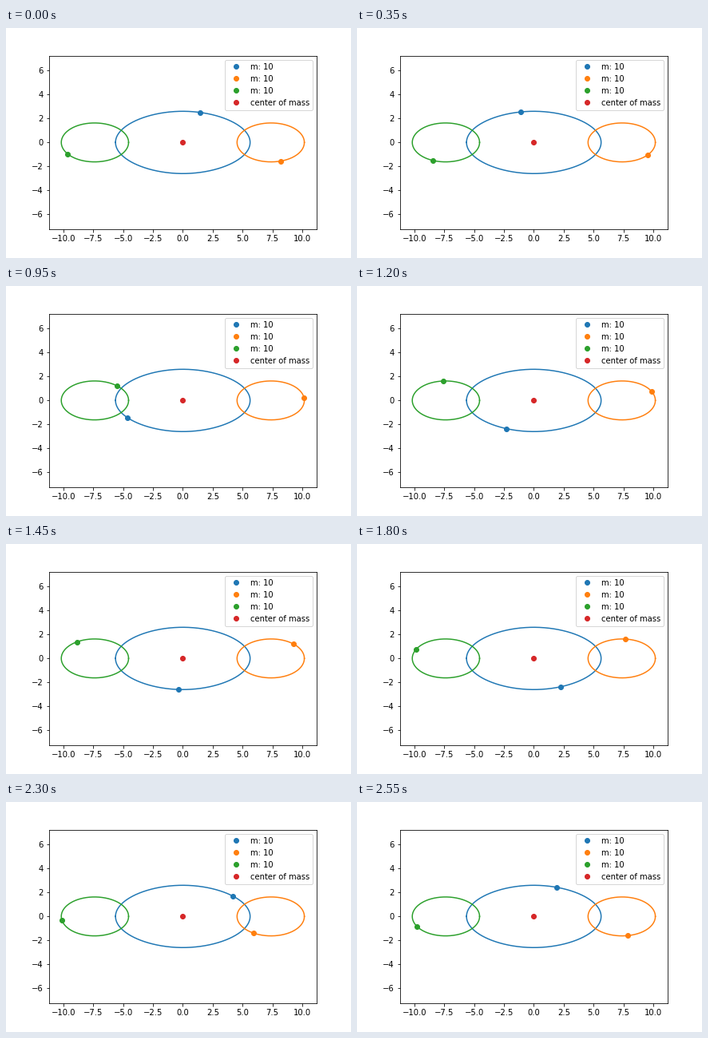
Recreate the animation shown at these times as a matplotlib script. Size 432 px wide and 288 px high, loop 2.6 s.

```python
import numpy as np
import matplotlib.pyplot as plt
from matplotlib.animation import FuncAnimation

FRAMES, INTERVAL = 52, 50
PERIOD = 52.3        # frames per revolution
ALIGNED = 17.0       # frame at which the bodies line up with the heavy loop on the left
MASS = 10
REACH = 10.17        # farthest distance of the outer bodies
STEPS = 400          # integration steps per quarter period
SWAP = [0, 2, 1]     # exchange the two outer bodies


def slope(state):
    """Time derivative of (positions, velocities), both complex, under gravity."""
    z, v = state
    gap = np.roll(z, -1, axis=0) - z
    pull = gap / np.abs(gap) ** 3
    return np.array([v, MASS * (pull - np.roll(pull, 1, axis=0))])


def quarter(params):
    """Integrate from the aligned pose for a quarter period (RK4)."""
    x, v_in, v_out, time = params
    far = np.full_like(x, REACH)
    state = np.array([[-far - x, far, x],
                      [-1j * (v_in + v_out), 1j * v_out, 1j * v_in]])
    dt = time / STEPS
    path = [state[0]]
    for _ in range(STEPS):
        k1 = slope(state)
        k2 = slope(state + dt / 2 * k1)
        k3 = slope(state + dt / 2 * k2)
        k4 = slope(state + dt * k3)
        state = state + dt / 6 * (k1 + 2 * k2 + 2 * k3 + k4)
        path.append(state[0])
    return np.array(path), state


def mismatch(state):
    """Zero when the bodies form a mirror-symmetric triangle."""
    z, v = state
    return np.array([z[0].real, v[0].imag,
                     z[1].imag - z[2].imag, v[1].real - v[2].real])


def find_orbit():
    """Newton search for the start values that close the orbit."""
    params = np.array([-4.52, 2.74, 0.288, 4.89])
    eps = 1e-6
    nudges = eps * np.hstack([np.zeros((4, 1)), np.eye(4)])
    for _ in range(20):
        miss = mismatch(quarter(params[:, None] + nudges)[1])
        jac = (miss[:, 1:] - miss[:, :1]) / eps
        step = np.linalg.lstsq(jac, miss[:, 0], rcond=1e-3)[0]
        biggest = np.abs(step).max()
        params = params - step * min(1, 0.04 / max(biggest, 1e-12))
        if biggest < 1e-9:
            break
    return params


def full_track():
    """Unfold the quarter arc into a whole revolution by symmetry."""
    arc = quarter(find_orbit()[:, None])[0][:, :, 0]
    half = np.concatenate([arc, -np.conj(arc[::-1])[1:, SWAP]])
    return np.concatenate([half, -half[1:, SWAP]])


track = full_track()
phases = np.linspace(0, 1, len(track))

fig = plt.figure(figsize=(6, 4), dpi=72, facecolor="white")
ax = fig.add_axes([0.125, 0.125, 0.775, 0.755])
for body in range(3):
    ax.plot(track[:, body].real, track[:, body].imag, color=f"C{body}", lw=1.5)
dots = [ax.plot([], [], "o", color=f"C{body}", ms=6, label=f"m: {MASS}")[0]
        for body in range(3)]
ax.plot([0], [0], "o", color="C3", ms=6, label="center of mass")

half_width = 1.1 * REACH
half_height = half_width * (0.755 * 4) / (0.775 * 6)
ax.set_xticks(np.arange(-10, 10.1, 2.5))
ax.set_yticks(np.arange(-6, 7, 2))
ax.set_xlim(-half_width, half_width)
ax.set_ylim(-half_height, half_height)
ax.legend(loc="upper right")


def update(frame):
    phase = (frame - ALIGNED) / PERIOD % 1
    for body, dot in enumerate(dots):
        z = track[:, body]
        dot.set_data([np.interp(phase, phases, z.real)],
                     [np.interp(phase, phases, z.imag)])
    return dots


anim = FuncAnimation(fig, update, frames=FRAMES, interval=INTERVAL,
                     repeat=True, repeat_delay=0)
plt.show()
```
